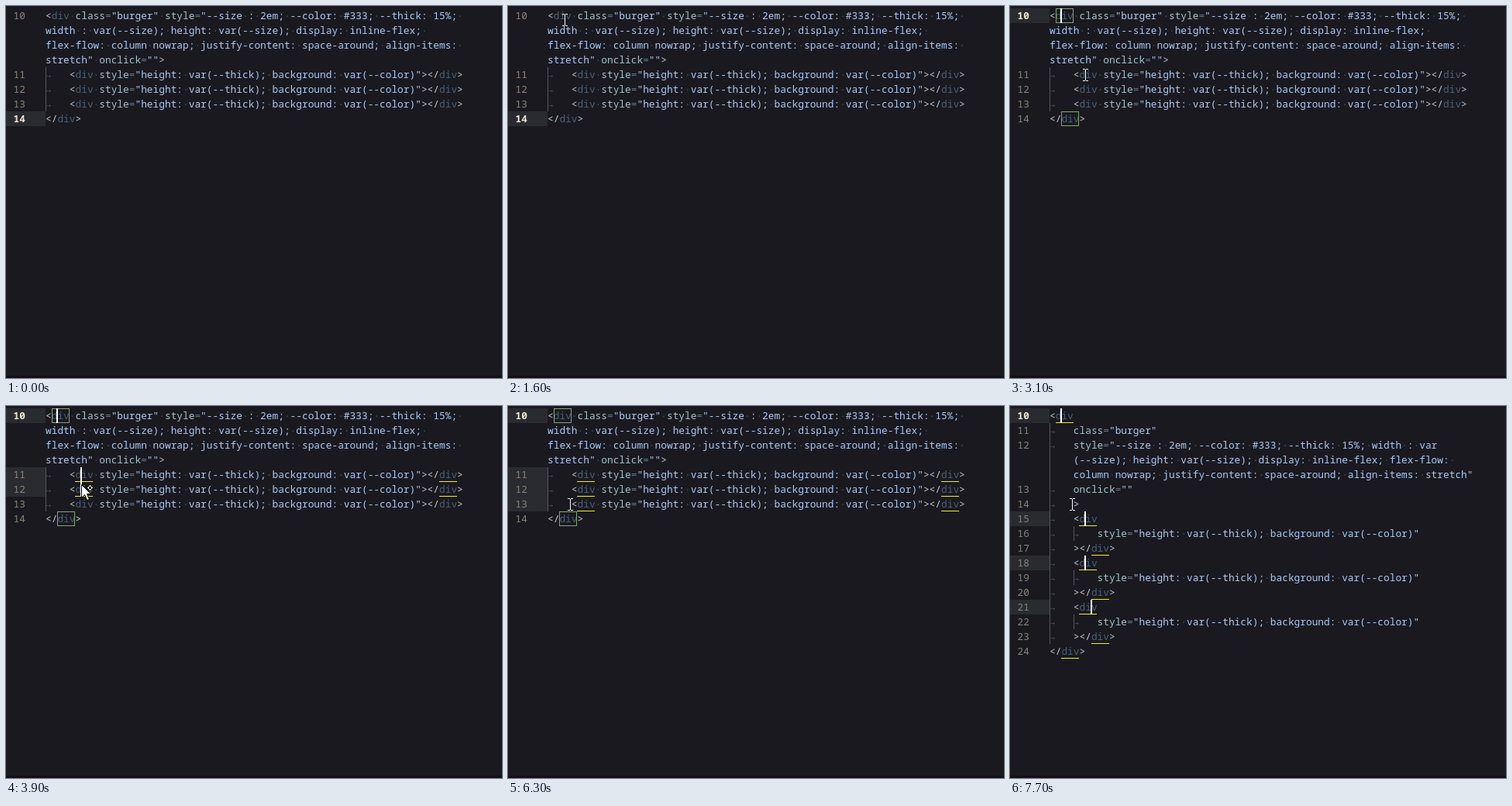
Animation, 640 px wide and 480 px high, one loop 8000 ms. Source, as an HTML page with a canvas:

```html
<!DOCTYPE html>
<html lang="en">
<head>
<meta charset="utf-8">
<title>Multi-cursor editing</title>
<style>
  html, body { margin: 0; width: 100%; height: 100%; overflow: hidden; background: #1a191f; }
  canvas { display: block; width: 640px; height: 480px; }
</style>
</head>
<body>
<canvas id="stage" width="640" height="480"></canvas>
<script>
const ctx = document.getElementById('stage').getContext('2d');
const LOOP = 8000, STEP = 100, BLINK = 490;
const CLICK = 1700, EXPAND = 6800;
const LEFT = 51, TOP = 3, CHAR = 7.697, LINE = 19, TAB = 4;
const FONT = "12.83px 'Noto Sans Mono', 'DejaVu Sans Mono', monospace";

const COLOR = {
  bg: '#1a191f', footer: '#121016', gutter: '#2a2b31', guide: '#55555c', space: '#4d586b',
  number: '#88837b', current: '#eee6d0', bracket: '#c3cad2', tag: '#4b6179',
  attr: '#a1c6cb', equals: '#667889', string: '#a9cbf8',
  white: '#ffffff', underline: '#f4ee28', match: '#7fa872'
};

// Rows: line number (empty when wrapped), text, wrap indent in tabs
const BAR = '"height: var(--thick); background: var(--color)"';
const bar = n => [n, `\t<div style=${BAR}></div>`];
const splitBar = n => [[n, '\t<div'], [n + 1, `\t\tstyle=${BAR}`], [n + 2, '\t></div>']];

const compact = [
  [10, '<div class="burger" style="--size : 2em; --color: #333; --thick: 15%; '],
  ['', 'width : var(--size); height: var(--size); display: inline-flex; '],
  ['', 'flex-flow: column nowrap; justify-content: space-around; align-items: '],
  ['', 'stretch" onclick="">'],
  ...[11, 12, 13].map(bar),
  [14, '</div>']
];
const expanded = [
  [10, '<div'],
  [11, '\tclass="burger"'],
  [12, '\tstyle="--size : 2em; --color: #333; --thick: 15%; width : var'],
  ['', '(--size); height: var(--size); display: inline-flex; flex-flow: ', 1],
  ['', 'column nowrap; justify-content: space-around; align-items: stretch"', 1],
  [13, '\tonclick=""'],
  [14, '\t>'],
  ...[15, 18, 21].flatMap(splitBar),
  [24, '</div>']
];

// Each added caret shows on click; its row is marked shortly after
const extras = [3300, 3900, 4750].map((mark, i) => ({
  mark, click: mark - STEP, row: 4 + i, splitRow: 7 + 3 * i, col: i < 2 ? 6 : 7
}));
const resets = [CLICK, ...extras.flatMap(e => [e.click, e.mark])];

// Pointer moves: start, end, x, y
const moves = [
  [400, 500, 37, 8], [500, 800, 66, 8], [900, 1300, 80, 22], [1500, 1700, 66, 13],
  [1800, 2100, 101, 48], [2100, 2500, 108, 86], [2600, 2800, 97, 89],
  [3200, 3500, 97, 102], [3900, 4400, 105, 127], [4900, 5500, 86, 139], [5600, 5900, 80, 127]
];

const colX = col => LEFT + col * CHAR;
const rowY = row => TOP + row * LINE;

function rect(x, y, w, h, color) {
  ctx.fillStyle = color;
  ctx.fillRect(x, y, w, h);
}

function glyph(c, col, row, color) {
  ctx.fillStyle = color;
  ctx.fillText(c, colX(col), rowY(row) + 14);
}

function drawCode(rows) {
  let quoted = false;
  rows.forEach(([, text, indent = 0], row) => {
    let col = indent * TAB, tag = false;
    for (const c of text) {
      if (c === '\t') {
        glyph('→', col, row, COLOR.guide);
        col += TAB;
        continue;
      }
      let color = COLOR.attr;
      if (c === ' ') {
        tag = false;
        color = COLOR.space;
      } else if (c === '"') {
        quoted = !quoted;
        color = COLOR.string;
      } else if (quoted) {
        color = COLOR.string;
      } else if ('</>'.includes(c)) {
        tag = c !== '>';
        color = COLOR.bracket;
      } else if (c === '=') {
        color = COLOR.equals;
      } else if (tag) {
        color = COLOR.tag;
      }
      glyph(c === ' ' ? '·' : c, col++, row, color);
    }
  });
}

function drawGuides(rows) {
  rows.forEach(([, text, indent = 0], row) => {
    const depth = indent + text.lastIndexOf('\t') + 1;
    for (let i = 0; i < depth; i++) rect(Math.round(colX(i * TAB)), rowY(row), 1, LINE, COLOR.guide);
  });
}

function drawNumbers(rows, current) {
  rows.forEach(([n], row) => {
    const active = row === current;
    ctx.font = (active ? 'bold ' : '') + FONT;
    ctx.fillStyle = active ? COLOR.current : COLOR.number;
    ctx.fillText(n, 9.6, rowY(row) + 14);
  });
  ctx.font = FONT;
}

const highlight = row => rect(0, rowY(row), LEFT, LINE, COLOR.gutter);
const underline = (col, row) => rect(Math.round(colX(col)), rowY(row) + LINE - 1, 23, 1, COLOR.underline);
const caret = (col, row) => rect(Math.round(colX(col)) - 1, rowY(row), 2, LINE, COLOR.white);

function frameWord(col, row) {
  ctx.strokeStyle = COLOR.match;
  ctx.lineWidth = 1;
  ctx.strokeRect(Math.round(colX(col)) + 0.5, rowY(row) + 0.5, 22, LINE - 1);
}

function pointerAt(t) {
  let [, , x, y] = moves[0];
  for (const [from, to, nx, ny] of moves) {
    const k = Math.min(1, Math.max(0, (t - from) / (to - from)));
    x += (nx - x) * k;
    y += (ny - y) * k;
  }
  return [Math.round(x), Math.round(y)];
}

function drawBeam(x, y) {
  rect(x, y - 7, 1, 14, COLOR.white);
  for (const end of [y - 8, y + 7]) {
    rect(x - 3, end, 3, 1, COLOR.white);
    rect(x + 1, end, 3, 1, COLOR.white);
  }
}

function polygon(x, y, points) {
  ctx.beginPath();
  points.forEach(([a, b]) => ctx.lineTo(x + a, y + b));
  ctx.closePath();
  ctx.fillStyle = COLOR.white;
  ctx.strokeStyle = '#000';
  ctx.lineWidth = 1;
  ctx.fill();
  ctx.stroke();
}

function drawArrow(x, y) {
  polygon(x + 0.5, y - 0.5, [[0, 0], [0, 17], [4, 13], [7, 20], [10, 19], [7, 12], [12, 12]]);
  polygon(x + 11.5, y + 3.5, [[0, -4], [4, 0], [0, 4], [-4, 0]]);
  rect(x + 10, y + 2, 3, 3, '#000');
}

function caretsLit(t) {
  const last = resets.filter(r => r <= t).pop();
  return last !== undefined && (t - last) % (2 * BLINK) < BLINK;
}

function draw(t) {
  const open = t >= EXPAND;
  const rows = open ? expanded : compact;
  const current = t < CLICK + 200 ? 7 : 0;
  const lit = caretsLit(t);

  rect(0, 0, 640, 480, COLOR.bg);
  rect(0, 477, 640, 3, COLOR.footer);
  highlight(current);
  for (const e of extras) if (t >= e.mark) highlight(open ? e.splitRow : e.row);
  drawGuides(rows);
  drawNumbers(rows, current);
  drawCode(rows);

  if (open) {
    underline(1, 0);
    underline(2, rows.length - 1);
  } else if (t >= CLICK) {
    frameWord(1, 0);
    frameWord(2, 7);
  }

  if (lit) caret(2, 0);
  for (const e of extras) {
    if (t < e.click) continue;
    const row = open ? e.splitRow : e.row;
    underline(5, row);
    if (open) underline(7, row + 2);
    else if (t >= e.mark) underline(66, row);
    if (lit) caret(e.col, row);
  }

  const dragging = t >= extras[1].click && t < extras[1].mark + 200;
  if (t >= 500) (dragging ? drawArrow : drawBeam)(...pointerAt(t));
}

const start = performance.now();
let shown = -1;
function tick() {
  const t = Math.floor((performance.now() - start) % LOOP / STEP) * STEP;
  if (t !== shown) draw(shown = t);
  requestAnimationFrame(tick);
}
ctx.font = FONT;
tick();
</script>
</body>
</html>
```
